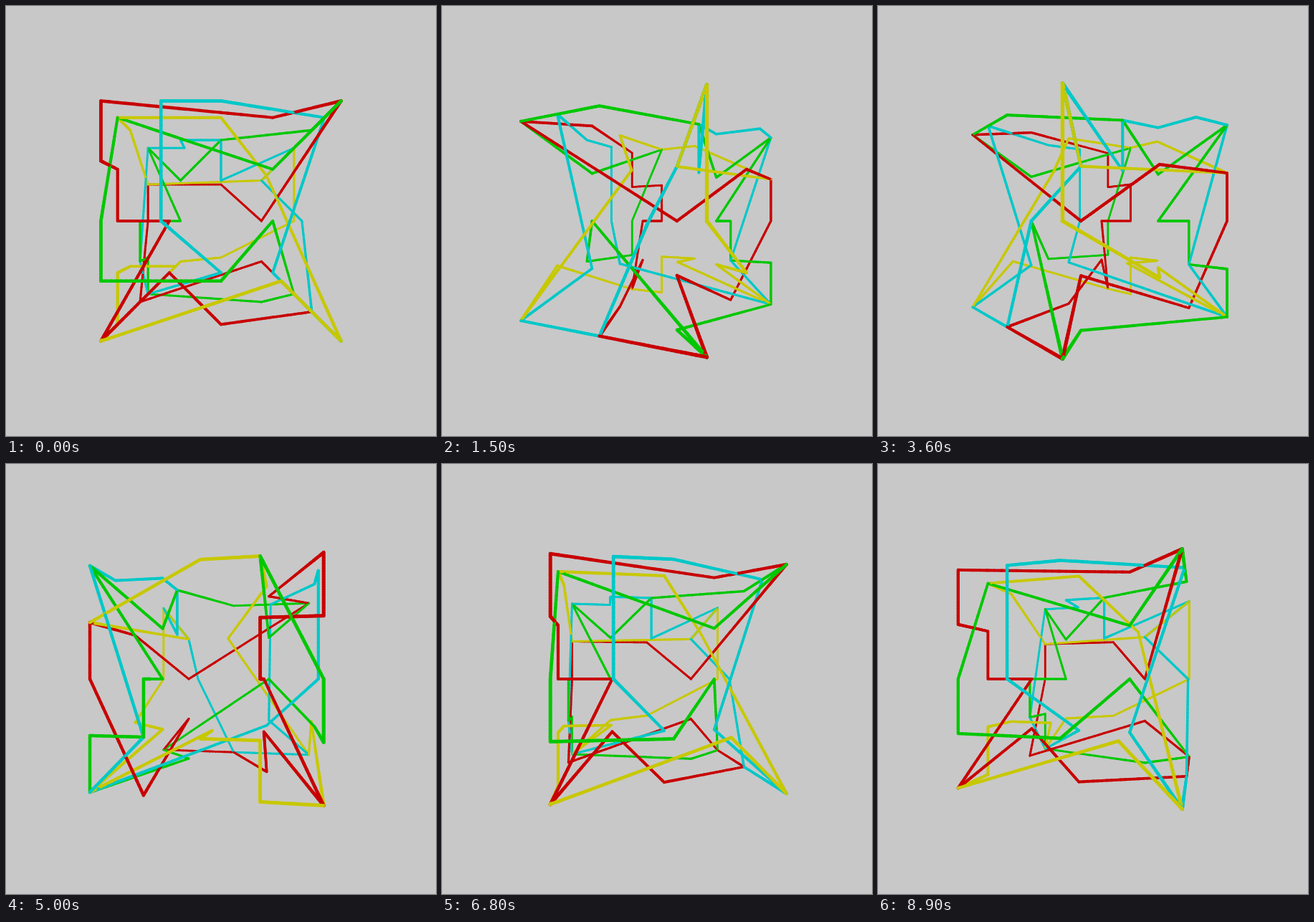
Recreate the animation shown at these times as an HTML page with a canvas. Size 600x600 px, loop 9 s.

```html
<!DOCTYPE html>
<html lang="en">
<head>
<meta charset="utf-8">
<title>Four rotating loops</title>
<style>
  html, body { margin: 0; width: 100%; height: 100%; overflow: hidden; background: #c8c8c8; }
  canvas { display: block; }
</style>
</head>
<body>
<canvas id="stage" width="600" height="600"></canvas>
<script>
const ctx = document.getElementById("stage").getContext("2d");
const CENTER = 300;
const CAMERA = CENTER / Math.tan(Math.PI / 6);
const UNIT = 63.35;
const WEIGHT = 3.5;
const PIECES = 24;
const STEP_MS = 100;
const LOOP_STEPS = 90;
const TURNS = 4;

// Walks over a lattice that reaches from -2 to 2 on every axis.
class Walk {
  points = [];
  get last() { return this.points[this.points.length - 1]; }
  to(x, y, z) { this.points.push([x, y, z]); return this; }
  by(x, y, z) { const [a, b, c] = this.last; return this.to(a + x, b + y, c + z); }
  right(n = 1) { return this.by(n, 0, 0); }
  down(n = 1) { return this.by(0, n, 0); }
  back(n = 1) { return this.by(0, 0, -n); }
  inward() { return this.to(...this.last.map(v => v / 2)); }
}

const loop = new Walk()
  .to(-2, -2, 2).down().back().down().right()
  .to(-2, 2, 2).inward().to(0, 2, 1)
  .to(2, 2, 0).back(2).inward()
  .to(-2, 2, -1).to(-2, 0, -2).down(-1).right(2).by(1, 1, 1)
  .to(2, -2, 2).to(1, -2, 1)
  .points;

// The four strands are rotated copies of one loop.
const strands = [
  { color: "#c80000", turn: ([x, y, z]) => [x, y, z] },
  { color: "#00c800", turn: ([x, y, z]) => [x, -y, -z] },
  { color: "#00c8c8", turn: ([x, y, z]) => [y, x, -z] },
  { color: "#c8c800", turn: ([x, y, z]) => [x, z, -y] }
].map(({ color, turn }) => ({ color, points: loop.map(turn) }));

const mix = (a, b, t) => a.map((v, i) => v + (b[i] - v) * t);

function rotate([x, y, z], angle) {
  const c = Math.cos(angle), s = Math.sin(angle);
  return [(x * c + z * s) * UNIT, y * UNIT, (z * c - x * s) * UNIT];
}

function project([x, y, z]) {
  const scale = CAMERA / (CAMERA - z);
  return { x: CENTER + x * scale, y: CENTER + y * scale, z, scale };
}

// Short pieces sorted from far to near let the strands pass behind each other.
function collectPieces(angle) {
  const pieces = [];
  for (const { color, points } of strands) {
    const turned = points.map(p => rotate(p, angle));
    turned.forEach((from, i) => {
      const to = turned[(i + 1) % turned.length];
      let a = project(from);
      for (let k = 1; k <= PIECES; k++) {
        const b = project(mix(from, to, k / PIECES));
        // Rounding keeps the strand order where two of them coincide.
        pieces.push({ a, b, color, depth: Math.round((a.z + b.z) * 1000) });
        a = b;
      }
    });
  }
  return pieces.sort((p, q) => p.depth - q.depth);
}

function draw(step) {
  ctx.fillStyle = "#c8c8c8";
  ctx.fillRect(0, 0, 600, 600);
  ctx.lineCap = "round";
  const angle = 2 * Math.PI * TURNS * step / LOOP_STEPS;
  for (const { a, b, color } of collectPieces(angle)) {
    ctx.strokeStyle = color;
    ctx.lineWidth = WEIGHT * (a.scale + b.scale) / 2;
    ctx.beginPath();
    ctx.moveTo(a.x, a.y);
    ctx.lineTo(b.x, b.y);
    ctx.stroke();
  }
}

const start = performance.now();
let shown = 0;

function tick() {
  const step = Math.floor((performance.now() - start) / STEP_MS) % LOOP_STEPS;
  if (step !== shown) draw(shown = step);
  requestAnimationFrame(tick);
}

draw(0);
requestAnimationFrame(tick);
</script>
</body>
</html>
```
